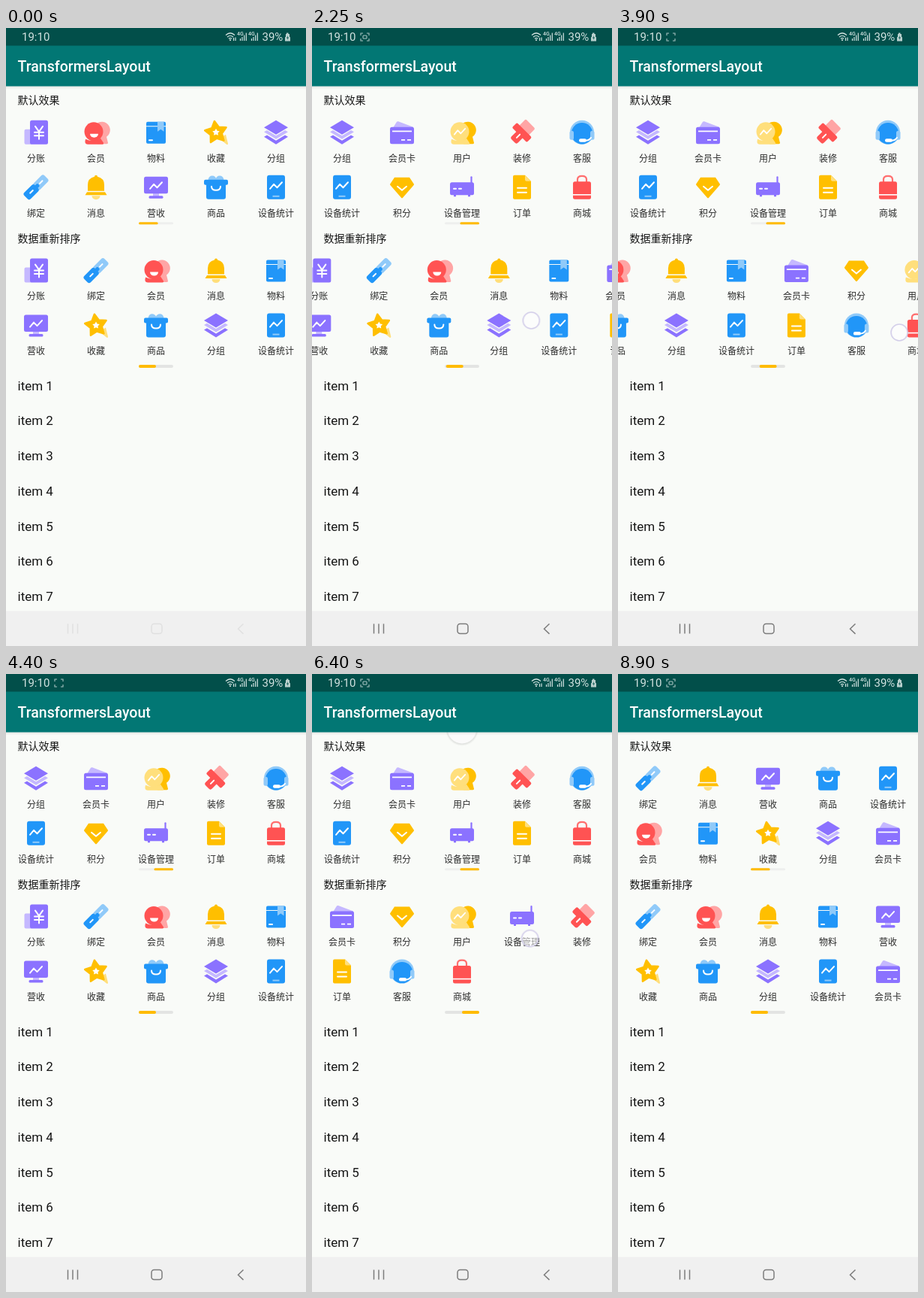
Write an HTML page that moves like this. It is 400 px wide and 822 px high and loops after 8.95 s.

```html
<!DOCTYPE html>
<html lang="zh-CN">
<head>
<meta charset="utf-8">
<title>TransformersLayout</title>
<style>
@property --s1 { syntax: "<number>"; inherits: true; initial-value: 0; }
@property --s2 { syntax: "<number>"; inherits: true; initial-value: 0; }
html, body { margin: 0; width: 100%; height: 100%; overflow: hidden; background: #f9fbf8; }
svg { display: block; width: 400px; height: 822px; }
#stage { animation: scroll1 8950ms linear infinite, scroll2 8950ms linear infinite; }
text { font-family: Roboto, "Noto Sans CJK SC", "Noto Sans CJK", sans-serif; fill: #161616; }
.label { font-size: 12px; text-anchor: middle; fill: #2b2b2b; }
.head { font-size: 14px; }
.item { font-size: 17px; }
.title { font-size: 19.5px; font-weight: 500; fill: #fff; }
.status { font-size: 15px; fill: #d3e2e0; }
.tiny { font-size: 7px; font-weight: 500; fill: #d3e2e0; }

.p { fill: #8b72ff; } .pl { fill: #c5b8ff; }
.r { fill: #ff5353; } .rl { fill: #ffa5a5; }
.y { fill: #ffbf00; } .yl { fill: #ffdf7c; }
.b { fill: #2196f8; } .bl { fill: #90caf9; }
.w { fill: #fff; }
.ln { fill: none; stroke: #fff; stroke-width: 2; stroke-linecap: round; stroke-linejoin: round; }

.strip1 { transform: translateX(calc(var(--s1) * -1px)); }
.strip2 { transform: translateX(calc(var(--s2) * -1px)); }
.thumb1 { transform: translateX(calc(var(--s1) * .0639px)); }
.thumb2 { transform: translateX(calc(var(--s2) * .0575px)); }
.before { animation: before 8950ms step-end infinite; }
.after { animation: after 8950ms step-end infinite; }
#nav { animation: nav 8950ms linear infinite; }
#rec { animation: rec 8950ms step-end infinite; }
#lens { animation: lens 8950ms step-end infinite; }
#touch { animation: touch 8950ms linear infinite; }
#wheel { animation: wheel 8950ms linear infinite; }
#arc { animation: arc 8950ms linear infinite; }

@keyframes scroll1 {
  0%, 6.7% { --s1: 0; }
  10.06% { --s1: 170; animation-timing-function: cubic-bezier(.15, .6, .4, 1); }
  17.88%, 94.4% { --s1: 320; }
  94.41%, 100% { --s1: 0; }
}
@keyframes scroll2 {
  0%, 23.46% { --s2: 0; }
  25.14% { --s2: 30; }
  27.37% { --s2: 170; animation-timing-function: cubic-bezier(.2, .6, .5, .95); }
  34.08% { --s2: 312; animation-timing-function: ease-out; }
  37.99%, 41.34% { --s2: 330; }
  43.58% { --s2: 203; animation-timing-function: cubic-bezier(.2, .6, .4, 1); }
  48.04%, 49.72% { --s2: 0; }
  51.4% { --s2: 120; animation-timing-function: cubic-bezier(.2, .6, .4, 1); }
  55.87%, 94.4% { --s2: 400; }
  94.41%, 100% { --s2: 0; }
}
@keyframes before { 0% { visibility: visible; } 94.41%, 100% { visibility: hidden; } }
@keyframes after { 0% { visibility: hidden; } 94.41%, 100% { visibility: visible; } }
@keyframes nav { 0%, .5% { opacity: .13; } 4.47%, 100% { opacity: 1; } }
@keyframes rec { 0% { opacity: 0; } 4.47%, 100% { opacity: 1; } }
@keyframes lens { 0% { opacity: 1; } 30.73% { opacity: 0; } 62.57%, 100% { opacity: 1; } }
@keyframes touch {
  0%, 6.3% { transform: translate(335px, 190px); opacity: 0; }
  6.5% { transform: translate(335px, 190px); opacity: 1; }
  10.06% { transform: translate(157px, 194px); opacity: 1; }
  10.3% { transform: translate(157px, 194px); opacity: 0; }
  22.9% { transform: translate(331px, 386px); opacity: 0; }
  23.1% { transform: translate(331px, 386px); opacity: 1; }
  25.14% { transform: translate(293px, 389px); opacity: 1; }
  27.37% { transform: translate(153px, 392px); opacity: 1; }
  27.6% { transform: translate(153px, 392px); opacity: 0; }
  41% { transform: translate(240px, 400px); opacity: 0; }
  41.2% { transform: translate(240px, 400px); opacity: 1; }
  43.58% { transform: translate(375px, 405px); opacity: 1; }
  44% { transform: translate(382px, 405px); opacity: 0; }
  49.3% { transform: translate(328px, 395px); opacity: 0; }
  49.5% { transform: translate(328px, 395px); opacity: 1; }
  51.4% { transform: translate(200px, 392px); opacity: 1; }
  51.6% { transform: translate(200px, 392px); opacity: 0; }
  69.2% { transform: translate(285px, 290px); opacity: 0; }
  69.4% { transform: translate(285px, 290px); opacity: 1; }
  77.65% { transform: translate(307px, 530px); opacity: 1; }
  77.9%, 100% { transform: translate(307px, 530px); opacity: 0; }
}
@keyframes wheel {
  0%, 69.83% { transform: translate(200px, 50px); }
  76%, 77.65% { transform: translate(200px, 134px); animation-timing-function: ease-out; }
  79.5%, 94.41% { transform: translate(200px, 121px); }
  96.09%, 100% { transform: translate(200px, 121px) scale(0); }
}
@keyframes arc {
  0%, 69.83% { transform: rotate(-200deg); stroke-dasharray: 0 360; stroke-opacity: .3; }
  76% { transform: rotate(-130deg); stroke-dasharray: 260 360; stroke-opacity: 1; }
  77.65% { transform: rotate(-110deg); stroke-dasharray: 260 360; stroke-opacity: 1; }
  79% { transform: rotate(-82deg); stroke-dasharray: 20 360; stroke-opacity: 1; }
  83.8% { transform: rotate(-8deg); stroke-dasharray: 190 360; stroke-opacity: 1; }
  85.65% { transform: rotate(19deg); stroke-dasharray: 288 360; stroke-opacity: 1; }
  93.1% { transform: rotate(405deg); stroke-dasharray: 10 360; stroke-opacity: 1; }
  94.41%, 100% { transform: rotate(424deg); stroke-dasharray: 30 360; stroke-opacity: 1; }
}
</style>
</head>
<body>
<svg id="stage" viewBox="0 0 400 822">
  <defs>
    <linearGradient id="shade" x2="0" y2="1">
      <stop stop-color="#000" stop-opacity=".08"/>
      <stop offset="1" stop-color="#000" stop-opacity="0"/>
    </linearGradient>
    <radialGradient id="halo">
      <stop offset=".84" stop-color="#000" stop-opacity=".12"/>
      <stop offset="1" stop-color="#000" stop-opacity="0"/>
    </radialGradient>
  </defs>
  <rect width="400" height="822" fill="#f9fbf8"/>
  <g id="content"></g>

  <g id="wheel">
    <circle cy=".7" r="22" fill="url(#halo)"/>
    <circle r="19.4" fill="#fafafa"/>
    <circle id="arc" r="8.2" pathLength="360" fill="none" stroke="#111" stroke-width="2.6"/>
  </g>

  <rect y="77.5" width="400" height="4" fill="url(#shade)"/>
  <rect width="400" height="77.5" fill="#027774"/>
  <rect width="400" height="23.5" fill="#024f4a"/>
  <text class="title" x="15.5" y="58">TransformersLayout</text>

  <text class="status" x="21" y="17">19:10</text>
  <g id="rec" fill="none" stroke="#a9c4c1" stroke-width="1.1">
    <path d="M65 10V7h3M73 7h3v3M76 14v3h-3M68 17h-3v-3"/>
    <rect id="lens" x="68" y="10" width="5" height="4" rx="1"/>
  </g>
  <g fill="none" stroke="#d3e2e0" stroke-width="1.2">
    <path d="M293 9.5q6-5.5 12 0M295 12q4-3.5 8 0M297 14.3q2-1.8 4 0"/>
    <path d="M303.5 17v-4M306 12.5V17"/>
    <path d="M312.5 17v-3M315 17v-5M317.7 17V9.5M320.3 17V6.5M327.5 17v-3M330 17v-5M332.7 17V9.5M335.3 17V6.5"/>
  </g>
  <circle cx="299" cy="16" r="1.1" fill="#d3e2e0"/>
  <text class="tiny" x="308" y="10">4G</text>
  <text class="tiny" x="323" y="10">4G</text>
  <text class="status" x="341.5" y="17">39%</text>
  <path d="M373 8h1V6.5h2.5V8h1.500v3.500l1 1V17.500h-7v-5l1-1z" fill="#b9d0cd"/>
  <path d="M376 10l-2 3.500h1.500l-.5 2.500 2-3.500h-1.500z" fill="#024f4a"/>

  <rect y="775.5" width="400" height="46.5" fill="#f0f0f0"/>
  <g id="nav" fill="none" stroke="#7c7c7c" stroke-width="1.5">
    <path d="M82.5 792.5v13M89 792.5v13M95.5 792.5v13"/>
    <rect x="194" y="792.5" width="14" height="13" rx="3.5"/>
    <path d="M316.5 792.5l-7 6.700 7 6.700"/>
  </g>
  <g id="touch"><circle r="11" fill="#fff" fill-opacity=".55" stroke="#d2cde9" stroke-width="1.6"/></g>
</svg>
<script>
const zigzag = '<path class="ln" d="M-8 2l5-6 4.5 4.5 6.5-7"/>';
const star = r => Array.from({ length: 10 }, (_, i) => {
  const a = Math.PI * (i / 5 - .5), d = i % 2 ? r * .53 : r;
  return (d * Math.cos(a)).toFixed(1) + ',' + (d * Math.sin(a)).toFixed(1);
}).join(' ');
const link = (tone, x) =>
  `<rect class="${tone}" x="${x - 10}" y="-6" width="20" height="12" rx="3"/>`;
const heads = (front, back) => `
  <path class="${back}" d="M-3-5A11 11 0 1 1 14 6l2 8q0 1.500-2 1.500H2z"/>
  <circle class="${front}" cx="-3" cy="-1" r="12.5"/>
  <path class="${front}" d="M-14 9q11 5 20-1l4 6q.5 2-2 2h-19q-5 0-3-7z"/>`;

const icons = {
  分账: `<rect class="pl" x="-15.5" y="-4" width="11" height="20" rx="2"/>
    <rect class="p" x="-8" y="-16" width="24" height="32" rx="2.5"/>
    <path class="ln" d="M-1-8l5 7 5-7M4-1v10M-2 0h12M-2 4.5h12"/>`,
  绑定: `<g transform="rotate(-45)">${link('bl', 9)}${link('b', -9)}
    <rect class="b" x="-4" y="-2.5" width="9" height="5" rx="1.5"/>
    <path class="ln" d="M-11 0h5M7 0h5"/></g>`,
  会员: `${heads('r', 'rl')}<path class="w" d="M-8 2H3a5.5 5 0 0 1-11 0z"/>`,
  消息: `<path class="y" d="M-2-14a2 2 0 0 1 4 0q9 2 9 11v8h-22v-8q0-9 9-11z"/>
    <path class="y" d="M-12 6.5h24l2.5 4h-29z"/>
    <path class="yl" d="M-5.5 11.5h11a5.5 5 0 0 1-11 0z"/>`,
  物料: `<path class="b" d="M-11-14h22q2 0 2 2v3.5h-26V-12q0-2 2-2z"/>
    <path class="b" d="M-13-7.5h26V13q0 2-2 2h-22q-2 0-2-2z"/>
    <path class="bl" d="M2-14h8.5v13l-4.2-3L2-1z"/><path class="ln" d="M-9 10.5h4" stroke-width="1.5"/>`,
  营收: `<path class="pl" d="M-4 8h8v5h-8z"/><rect class="p" x="-16" y="-14" width="32" height="22.5" rx="2.5"/>
    <rect class="p" x="-9.5" y="11.5" width="19" height="3.5" rx="1.5"/>${zigzag}`,
  收藏: `<path class="yl" d="M4 8l9-5 3 12q0 2-2 1z"/>
    <polygon class="y" points="${star(15)}" stroke="#ffbf00" stroke-width="2.5" stroke-linejoin="round" transform="rotate(-8)"/>
    <polygon class="w" points="${star(5)}"/>`,
  商品: `<path class="bl" d="M-10-8a5 5 0 0 1 10-4 5 5 0 0 1 10 4z"/>
    <rect class="b" x="-16" y="-10" width="32" height="7" rx="2"/>
    <path class="b" d="M-13-4h26v17q0 3-3 3h-20q-3 0-3-3z"/>
    <path class="ln" d="M-6-1q0 5 6 5t6-5"/>`,
  分组: `<path class="p" d="M0-16L16-6.5 0 3-16-6.5z"/>
    <path class="pl" d="M-16-.5l4-2.3L0 4.5 12-2.8 16-.5 0 9z"/>
    <path class="p" d="M-16 6l4-2.3L0 11 12 3.7 16 6 0 16z"/>`,
  设备统计: `<rect class="b" x="-12" y="-16" width="24" height="32" rx="3"/>${zigzag}
    <path d="M-4.5 12h9" stroke="#90caf9" stroke-width="2"/>`,
  会员卡: `<path class="pl" d="M-12-6l5-8q1-1 2-.5L15-7v4z"/>
    <rect class="p" x="-16" y="-7" width="32" height="22.5" rx="2.5"/>
    <path d="M-13-1.500h26M-1 10h5M7 10h5" fill="none" stroke="#fff" stroke-width="1.800"/>`,
  积分: `<path class="y" d="M-10-13h20l6 9q0 1-1 2L1 14q-1 1-2 0L-15-2q-1-1-1-2z"/>
    <path class="ln" d="M-6-1l6 5 6-5"/>`,
  用户: `${heads('yl', 'y')}<g transform="translate(-3 1) scale(.9)">${zigzag}</g>`,
  设备管理: `<path d="M12.5-13.5v10" stroke="#8b72ff" stroke-width="2.2" stroke-linecap="round"/>
    <rect class="p" x="-16" y="-6.5" width="32" height="17" rx="2.5"/>
    <path class="p" d="M-11 10h3v2.500h-3zM8 10h3v2.500h-3z"/><path class="ln" d="M-11 2h3M-4 2h3"/>`,
  装修: `<g transform="rotate(45)"><rect class="rl" x="-9" y="-16" width="18" height="13" rx="2"/>
    <rect class="r" x="-14" y="-4.5" width="28" height="9.5" rx="2"/>
    <path class="r" d="M-6 4H6v9.500q0 3-3 3h-6q-3 0-3-3z"/>
    <path class="ln" d="M0 4v6"/></g>`,
  订单: `<path class="y" d="M-10-16H4l8 8v22q0 2-2 2h-20q-2 0-2-2v-28q0-2 2-2z"/>
    <path class="yl" d="M4-16l8 8H6q-2 0-2-2z"/><path class="ln" d="M-6 1H6M-6 7H6"/>`,
  客服: `<circle class="bl" r="16"/><circle class="b" r="14.2" cy="1.5"/>
    <rect class="bl" x="-16.5" y="-2" width="5.5" height="12" rx="2.5"/>
    <rect class="bl" x="11" y="-2" width="5.5" height="12" rx="2.5"/>
    <path class="ln" d="M12 7q-2 4-8 4"/><rect class="w" x="-4" y="8.5" width="10" height="4.5" rx="2.2"/>`,
  商城: `<path d="M-6-6v-4.5q0-4.5 6-4.5t6 4.5V-6" fill="none" stroke="#ff6f6f" stroke-width="2.2"/>
    <rect class="r" x="-12" y="-7.5" width="24" height="23.5" rx="2.5"/>
    <path d="M-12 10h24" stroke="#fff" stroke-width="1.6"/>`
};
const names = Object.keys(icons);

const cell = (name, col, row, top) => {
  const x = 40 + col * 80, y = top + row * 73;
  return `<g transform="translate(${x} ${y})">${icons[name]}</g>
    <text class="label" x="${x}" y="${y + 38.7}">${name}</text>`;
};
// order of places: down each column, or along each row of a five-column page
const byColumn = i => [i >> 1, i % 2];
const byRow = i => [Math.floor(i / 10) * 5 + i % 5, Math.floor(i / 5) % 2];
const strip = (list, place, top) => list.map((n, i) => cell(n, ...place(i), top)).join('');

const grid = (id, title, top, place, thumb, barY, barH, track) => `
  <text class="head" x="15.5" y="${top - 37.8}">${title}</text>
  <g class="before"><g class="strip${id}">${strip(names, place, top)}</g></g>
  <g class="after">${strip(names.slice(1, 11), place, top)}</g>
  <rect x="177" y="${barY}" width="46" height="${barH}" rx="${barH / 2}" fill="${track}"/>
  <rect class="thumb${id}" x="177" y="${barY}" width="${thumb}" height="${barH}" rx="${barH / 2}" fill="#ffbb00"/>`;

let html = grid(1, '默认效果', 138.8, byColumn, 25.6, 258.2, 3, '#eeefee')
  + grid(2, '数据重新排序', 322.6, byRow, 23, 448, 4, '#e3e4e3');
for (let i = 0; i < 7; i++)
  html += `<text class="item" x="15.5" y="${481.7 + i * 46.7}">item ${i + 1}</text>`;
document.getElementById('content').innerHTML = html;
</script>
</body>
</html>
```
